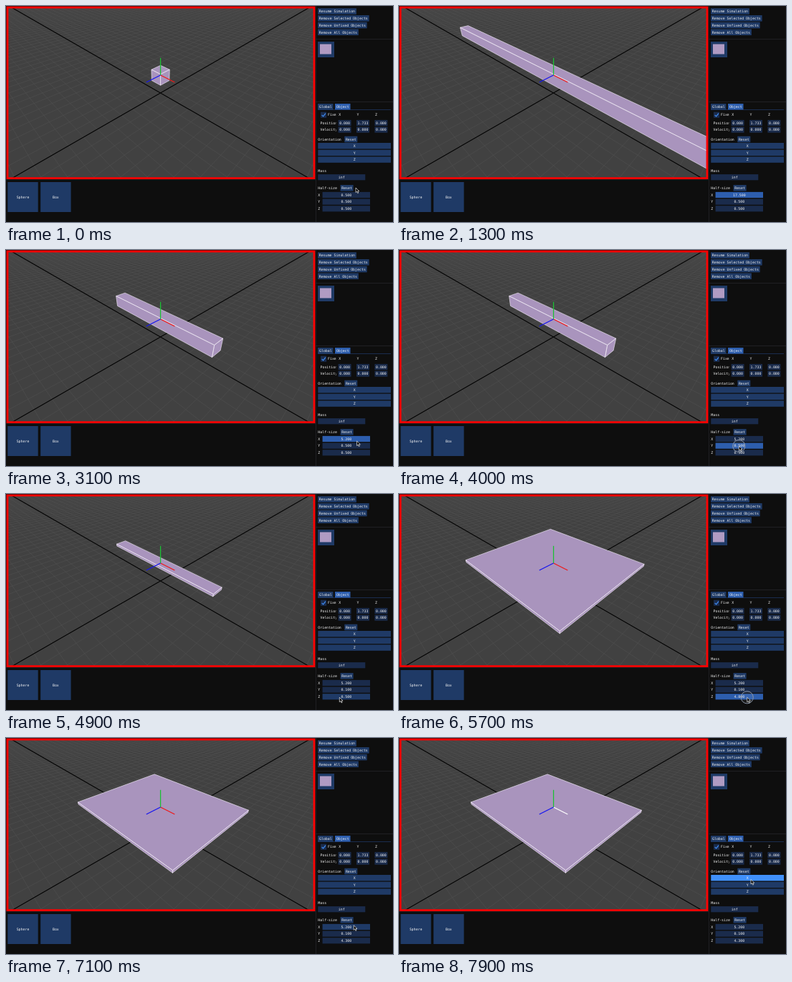
Recreate the animation shown at these times as an HTML page. Size 540 by 303 pixels, loop 8 s.

```html
<!DOCTYPE html>
<html lang="en">
<head>
<meta charset="utf-8">
<title>Box sizing</title>
<style>
  html, body { margin: 0; width: 100%; height: 100%; overflow: hidden; background: #0e0e0e; }
  svg { display: block; width: 540px; height: 303px; }
  text { font: 4.92px "DejaVu Sans Mono", monospace; fill: #f4f4f4; white-space: pre; }
</style>
</head>
<body>
<svg id="stage" viewBox="0 0 540 303" xmlns="http://www.w3.org/2000/svg">
  <defs>
    <clipPath id="view"><rect x="2" y="2" width="428" height="240"/></clipPath>
    <clipPath id="labels"><rect x="435" y="146" width="25.6" height="34"/></clipPath>
  </defs>
</svg>
<script>
const LOOP = 8000, STEP = 100;
const BUTTON = '#1f3a66', BUTTON_HOT = '#4090fa';
const FIELD = '#1a2b4b', FIELD_HOT = '#1f3a66', FIELD_ACTIVE = '#2d5eae';
const LILAC = '#a994bd', RULE = '#2c2c33';
const NAMES = ['X', 'Y', 'Z'];
const stage = document.getElementById('stage');

function el(name, attrs, parent = stage) {
  const node = document.createElementNS('http://www.w3.org/2000/svg', name);
  for (const key in attrs) node.setAttribute(key, attrs[key]);
  return parent.appendChild(node);
}
const rect = (x, y, width, height, fill, parent) => el('rect', { x, y, width, height, fill }, parent);
const line = (d, stroke, width, parent) => el('path', { d, stroke, 'stroke-width': width, fill: 'none' }, parent);

function label(str, x, y, anchor = 'start', parent = stage) {
  const node = el('text', { x, y: y + 1.75, 'text-anchor': anchor }, parent);
  node.textContent = str;
  return node;
}

// Camera at (10, 10, 10) looking at the origin
const COS = Math.sqrt(2 / 3), SIN = Math.sqrt(1 / 3), DIST = Math.sqrt(300), FOCAL = 288;
function project(x, y, z) {
  const side = (x - z) / Math.SQRT2, near = (x + z) / Math.SQRT2;
  const k = FOCAL / (DIST - near * COS - y * SIN);
  return [215.6 + side * k, 122 - (y * COS - near * SIN) * k].map(v => v.toFixed(2)).join(' ');
}

// Scene
const view = el('g', { 'clip-path': 'url(#view)' });
rect(0, 0, 432, 243, '#414141', view);
const EXTENT = 70;
function floorLines(n) {
  const end = Math.min(EXTENT, 28 - n);
  return `M${project(n, 0, -EXTENT)}L${project(n, 0, end)}M${project(-EXTENT, 0, n)}L${project(end, 0, n)}`;
}
let grid = '';
for (let n = -EXTENT; n <= EXTENT; n++) if (n) grid += floorLines(n);
line(grid, '#535353', 0.5, view);
line(floorLines(0), '#000', 1.1, view);

const CENTER_Y = 1.733;
const box = el('path', { fill: LILAC, stroke: '#eee8f3', 'stroke-width': 0.65, 'stroke-linejoin': 'round' }, view);
const AXIS_COLORS = ['#f01818', '#1cc034', '#1414f0'];
const axes = AXIS_COLORS.map((color, i) => {
  const tip = [0, CENTER_Y, 0];
  tip[i] += 1.5;
  return line(`M${project(0, CENTER_Y, 0)}L${project(...tip)}`, color, 1.3, view);
});

function drawBox(half) {
  // One visible face per axis, on its positive side
  const face = axis => {
    const corners = [[-1, -1], [1, -1], [1, 1], [-1, 1]].map(([a, b]) => {
      const p = [0, CENTER_Y, 0], sign = [];
      sign[axis] = 1;
      sign[(axis + 1) % 3] = a;
      sign[(axis + 2) % 3] = b;
      return project(...p.map((c, i) => c + sign[i] * half[i]));
    });
    return 'M' + corners.join('L') + 'Z';
  };
  box.setAttribute('d', face(0) + face(1) + face(2));
}
el('rect', { x: 2, y: 2, width: 428, height: 239.6, fill: 'none', stroke: '#f00', 'stroke-width': 2.8 });

// Panels and widgets
const widgets = [];
function widget(str, x, y, w, h, normal, hot) {
  const node = rect(x, y, w, h, normal);
  const text = label(str, x + w / 2, y + h / 2, 'middle');
  const item = { node, text, x, y, w, h, normal, hot };
  widgets.push(item);
  return item;
}
const button = (str, x, y, w, h = 8.6) => widget(str, x, y, w, h, BUTTON, BUTTON_HOT);
const field = (str, x, y, w) => widget(str, x, y, w, 8.2, FIELD, FIELD_HOT);

rect(432, 0, 0.6, 303, RULE);
rect(432, 46, 108, 0.6, RULE);
rect(432, 134.4, 108, 0.6, RULE);
rect(0, 243.6, 432, 0.5, RULE);

['Resume Simulation', 'Remove Selected Objects', 'Remove Unfixed Objects', 'Remove All Objects']
  .forEach((str, i) => button(str, 435, 3.2 + i * 9.75, str.length * 2.96 + 3.6));
['Sphere', 'Box'].forEach((str, i) => button(str, 2.3 + i * 45.9, 247, 42.4, 42));

rect(435, 50, 23, 22, BUTTON);
rect(438, 53.5, 16, 14, '#b09bc3');

['Global', 'Object'].forEach((str, i) => {
  rect(435 + i * 24, 137, 21.5, 8.4, i ? FIELD_ACTIVE : BUTTON);
  label(str, 437 + i * 24, 141.2);
});
rect(435, 145.4, 102, 0.4, FIELD_ACTIVE);

rect(439, 148.6, 8.2, 8.2, FIELD);
line('M440.7 152.8l1.9 2 3.3-4.2', BUTTON_HOT, 1.1);
const clipped = el('g', { 'clip-path': 'url(#labels)' });
label('Fixed', 449, 152.7, 'start', clipped);
label('Position', 438.5, 164, 'start', clipped);
label('Velocity', 438.5, 173.6, 'start', clipped);
NAMES.forEach((name, i) => {
  const x = 463.6 + i * 25.4;
  label(name, x + 0.6, 152.7);
  field((i === 1 ? CENTER_Y : 0).toFixed(3), x, 159.9, 18);
  field('0.000', x, 169.5, 18);
});

label('Orientation', 435.3, 187);
button('Reset', 472.3, 182.7, 18);
const turns = NAMES.map((name, i) => button(name, 435.3, 192 + i * 9.7, 101.7, 8.4));
label('Mass', 435.3, 230.8);
field('inf', 435.3, 236.1, 66);
label('Half-size', 435.3, 255.2);
button('Reset', 466.6, 251, 18);
const sizes = NAMES.map((name, i) => {
  const y = 260.9 + i * 9.65;
  label(name, 435.3, y + 4.1);
  return field('', 441.6, y, 66.4);
});

const ring = el('circle', { r: 8.6, fill: '#fff', 'fill-opacity': 0.06, stroke: '#8b96a8', 'stroke-width': 1 });
const cursor = el('path', {
  d: 'M0 0V6.5L1.6 5.1 2.7 7.6 3.8 7.1 2.7 4.7H4.8Z', fill: '#000', stroke: '#fff', 'stroke-width': 0.65
});

// Motion: each size is dragged in turn, easing between its turning points
const drags = [
  { arrive: 300, press: 400, release: 3200, x: 467.5, y: 268, keys: [[400, 0.5], [1700, 22.4], [2900, 5.2]] },
  { arrive: 3500, press: 3900, release: 4600, x: 474.5, y: 275, keys: [[3900, 0.5], [4500, 0.1]] },
  { arrive: 4700, press: 5000, release: 6800, x: 465.3, y: 285.3, keys: [[4900, 0.5], [5650, 4.8], [6000, 5.6], [6450, 4.3]] }
];
const PULL = 4.7; // pointer pixels per unit of size
const HOME = [488, 255], TURN_X = [491, 198.5], LAST_ARRIVAL = 7700;

const mix = (a, b, k) => a + (b - a) * k;
function ease(t, from, to) {
  const k = Math.min(1, Math.max(0, (t - from) / (to - from)));
  return k * k * (3 - 2 * k);
}
const size = ({ keys }, t) => keys.reduce(
  (v, [time, next], i) => i ? mix(v, next, ease(t, keys[i - 1][0], time)) : next, 0);
const grip = (drag, t) => [drag.x + (size(drag, t) - 0.5) * PULL, drag.y];

function pointer(t) {
  const i = drags.findIndex(d => t <= d.release);
  const next = drags[i], prev = i < 0 ? drags[drags.length - 1] : drags[i - 1];
  const from = prev ? grip(prev, t) : HOME;
  const to = next ? grip(next, t) : TURN_X;
  const k = ease(t, prev ? prev.release : 0, next ? next.arrive : LAST_ARRIVAL);
  return from.map((v, j) => mix(v, to[j], k));
}

function render(t) {
  // The scene shows the sizes of the step before
  drawBox(drags.map(d => size(d, t - STEP)));
  const [px, py] = pointer(t);
  const held = drags.findIndex(d => t >= d.press && t <= d.release);

  for (const w of widgets) {
    w.over = held < 0 && px >= w.x && px <= w.x + w.w && py >= w.y && py <= w.y + w.h;
    w.node.setAttribute('fill', w.over ? w.hot : w.normal);
  }
  sizes.forEach((w, i) => {
    w.text.textContent = size(drags[i], t).toFixed(1) + '00';
    if (i === held) w.node.setAttribute('fill', FIELD_ACTIVE);
  });
  axes.forEach((axis, i) => axis.setAttribute('stroke', turns[i].over ? '#fff' : AXIS_COLORS[i]));

  const place = `translate(${px.toFixed(2)} ${py.toFixed(2)})`;
  cursor.setAttribute('transform', place);
  ring.setAttribute('transform', place);
  ring.setAttribute('visibility', held > 0 ? 'visible' : 'hidden');
}

const start = performance.now();
function tick() {
  const t = (performance.now() - start) % LOOP;
  render(Math.floor(t / STEP) * STEP);
  requestAnimationFrame(tick);
}
tick();
</script>
</body>
</html>
```
